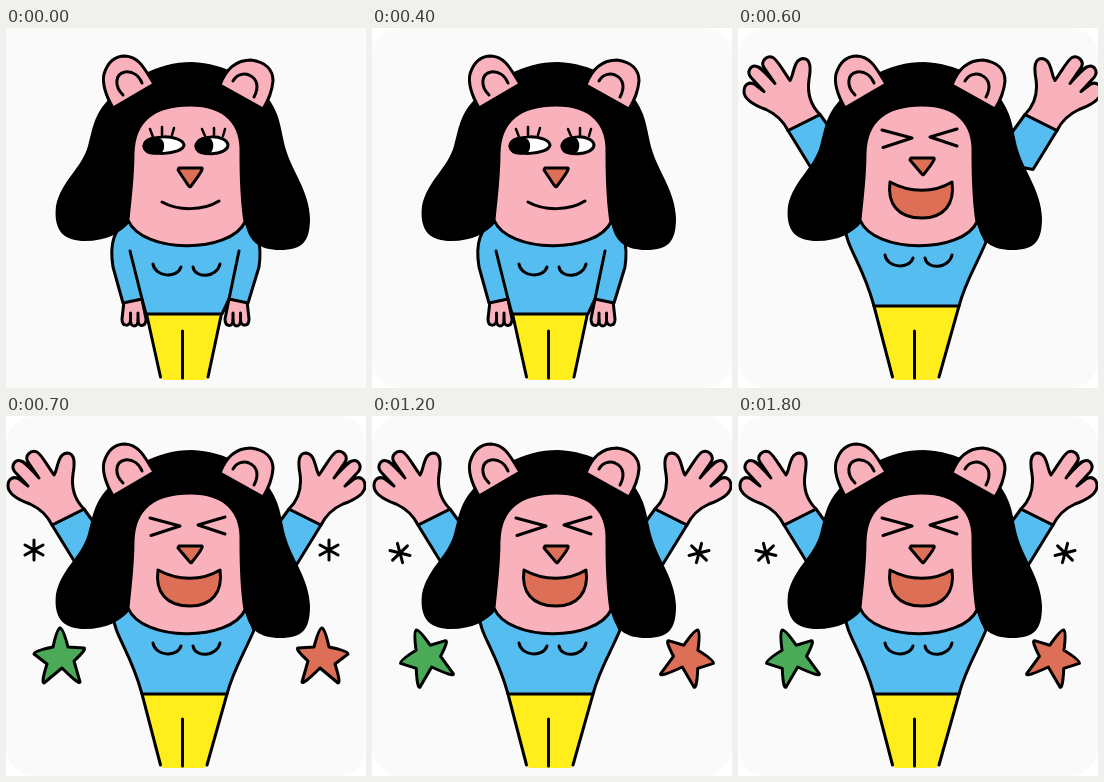
Write an HTML page that moves like this. It is 360 px wide and 360 px high and loops after 1.9 s.

```html
<!DOCTYPE html>
<html lang="en">
<head>
<meta charset="utf-8">
<title>Cheering bear</title>
<style>
  html, body { margin: 0; width: 100%; height: 100%; overflow: hidden; background: #fff; }
  svg { display: block; width: 100vw; height: 100vh; }
  .ink { stroke: #000; stroke-width: 3; stroke-linecap: round; stroke-linejoin: round; fill: none; }
  .pink { fill: #f9b1bc; }
  .blue { fill: #56bdf0; }
  .yellow { fill: #ffed1c; }
  .red { fill: #dc6f56; }
  .green { fill: #4aaa58; }
  .cheer, .sparks { display: none; }
  .up .cheer { display: inline; }
  .up .calm { display: none; }
  .party .sparks { display: inline; }
</style>
</head>
<body>
<svg id="stage" viewBox="0 0 360 360">
  <defs>
    <g id="arm">
      <path class="blue" d="M46 109L70 148L112 140L78 93Z"/>
      <path class="pink" d="M46 109C42 101 35 93 24 88C13 84 2 78 2 70C2 62 8 60 13 63L22 70L9 56C4 50 9 43 15 45C19 46 21 49 33 62L22 46C18 40 25 33 31 36C35 38 39 46 48 59C52 54 51 38 61 37C69 37 69 47 67 58C65 72 69 84 78 93Z"/>
    </g>
    <g id="hand">
      <path class="pink" d="M118 273L116 291C116 299 124 299 124.500 292C124 300 132 300 132 292C132 300 140 299 140 291L136 271Z"/>
      <path d="M124.500 285V292M132 285V292"/>
    </g>
    <path id="star" d="M54 212Q57 212 62 231L78 232Q81 233 68 245L74 266Q73 269 56 252L38 267Q35 267 41 248L28 238Q28 235 47 231Q51 213 54 212Z"/>
    <path id="spark" d="M0 -10V10M-9 -5L9 5M-9 5L9 -5"/>
  </defs>

  <rect id="card" width="360" height="360" fill="#fafafa"/>

  <g class="ink calm">
    <path class="yellow" stroke="none" d="M140 286H216L202 348Q201 352 197 352H159Q155 352 154 348Z"/>
    <path d="M141 288L154.500 349M215 288L202 349M176.500 303V350"/>
    <use href="#hand"/>
    <use href="#hand" transform="translate(359 0) scale(-1 1)"/>
    <path class="blue" d="M122 194C106 201 104 220 107 239L117 275L136 271L140 286H216L223 271L242 275L253 239C256 217 253 203 238 194Z"/>
    <path d="M124 223L136 271M233 223L223 271"/>
    <path d="M147 236C149 249 171 251 175 239M187 239C189 251 211 250 214 236"/>
  </g>

  <g class="ink cheer">
    <g id="arms">
      <use href="#arm"/>
      <use href="#arm" transform="translate(361 0) scale(-1 1)"/>
    </g>
    <path class="yellow" stroke="none" d="M136 278H221L201 348Q200 352 196 352H159Q155 352 154 348Z"/>
    <path d="M136 278L154.500 349M221 278L201 349M176.500 303V350"/>
    <path class="blue" d="M106 196C109 222 124 234 136 278H221C228 252 238 238 248 214L238 190H122Z"/>
    <path d="M147 227C149 240 171 242 175 230M187 230C189 242 211 241 214 227"/>
  </g>

  <path d="M104 70C88 86 87 100 82 118C76 140 55 153 50 178C47 205 60 213 79 213C100 213 115 205 124 194L239 193C242 214 254 222 274 222C297 222 304 213 304 190C303 163 287 145 280 122C274 100 275 88 262 70C245 53 220 35 186 34C150 34 122 53 104 70Z"/>

  <g class="ink">
    <path class="pink" d="M107 80C99 66 96 55 98 46C102 33 110 28 119 28C134 29 139 42 148 56Z"/>
    <path d="M117 67C108 58 109 46 119 44C127 43 133 48 136 55"/>
    <path class="pink" d="M214 57C220 41 230 32 245 32C260 34 267 42 267 53C266 64 262 73 257 81Z"/>
    <path d="M227 53C231 46 238 45 243 47C252 51 253 60 248 69"/>
    <path class="pink" d="M122 192C124 170 127 150 127 125C128 91 150 77 184 77C220 77 236 96 235 125C235 150 236 175 239 194C224 226 136 226 122 192Z"/>
  </g>

  <g class="ink calm">
    <path fill="#fff" d="M138 118C139 106 176 106 178 117C177 127 139 129 138 118Z"/>
    <path fill="#000" d="M138 118C139 110 149 109 154 112C158 115 157 122 154 124C148 126 139 126 138 118Z"/>
    <path fill="#fff" d="M190 118C191 106 221 106 222 117C221 128 191 129 190 118Z"/>
    <path fill="#000" d="M190 118C192 110 200 109 204 112C207 116 206 122 203 124C197 126 191 125 190 118Z"/>
    <path stroke-width="2.500" d="M144 101L147 109M156 99V107M168 100L166 107M196 101L199 108M208 100V107M219 101L217 108"/>
    <path class="red" d="M173 140H196Q198 141 185 158Q184 160 182 157L172 142Z"/>
    <path d="M156 174C172 183 197 183 213 173"/>
  </g>

  <g class="ink cheer">
    <path d="M144 102L174 110L145 119.500M219 101L192 109L219 118"/>
    <path class="red" d="M173 130H196Q198 131 186 146Q185 148 183 145L172 132Z"/>
    <path class="red" d="M152 154C172 165 196 165 214 154C217 176 206 190 184 190C160 190 149 176 152 154Z"/>
  </g>

  <g class="ink sparks">
    <use id="green" href="#star" class="green"/>
    <g transform="translate(370 0) scale(-1 1)"><use id="red" href="#star" class="red"/></g>
    <use id="sparkL" href="#spark"/>
    <use id="sparkR" href="#spark"/>
  </g>
</svg>
<script>
  const STEP = 100, STEPS = 19, RAISE = 5, SETTLE = 7;
  const $ = id => document.getElementById(id);
  const put = (id, value) => $(id).setAttribute('transform', value);
  let last = -1;

  function draw() {
    const step = Math.floor(performance.now() / STEP) % STEPS;
    if (step !== last) {
      last = step;
      const party = step >= SETTLE;
      const tilted = step % 2 === 0;
      $('stage').classList.toggle('up', step >= RAISE);
      $('stage').classList.toggle('party', party);
      $('card').setAttribute('rx', step ? 29 : 0);
      put('arms', party ? '' : 'translate(4 -6.5)');
      const star = tilted ? 'rotate(-20 55 241)' : '';
      put('green', star);
      put('red', star);
      put('sparkL', tilted ? 'translate(28 137) rotate(-15)' : 'translate(28 134)');
      put('sparkR', tilted ? 'translate(327 137) rotate(15)' : 'translate(323 134)');
    }
    requestAnimationFrame(draw);
  }
  draw();
</script>
</body>
</html>
```
